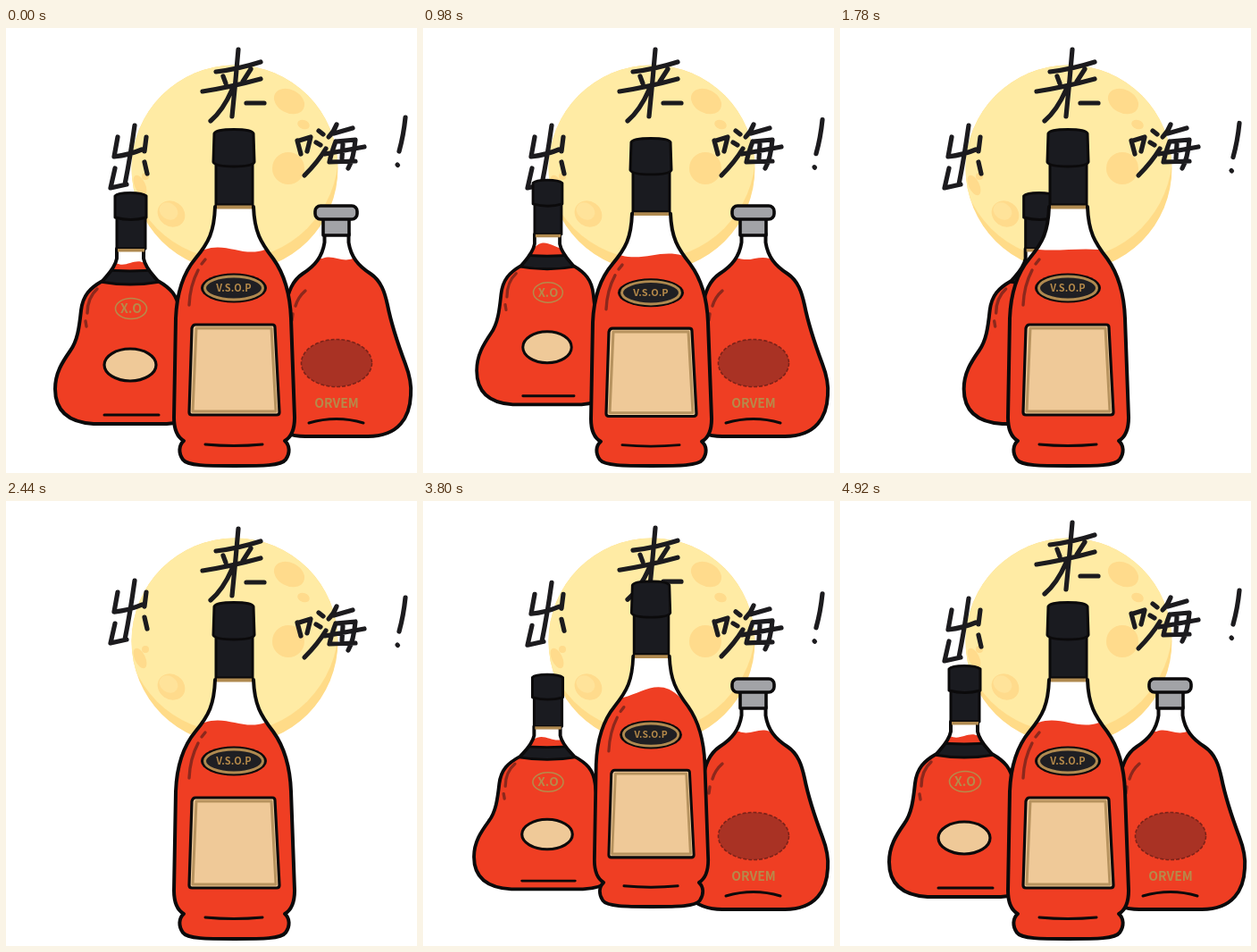
An HTML page that plays this animation: 460 px wide and 498 px high, repeating every 5 s.

```html
<!DOCTYPE html>
<html lang="zh">
<head>
<meta charset="utf-8">
<title>出来嗨</title>
<style>
html, body { margin: 0; width: 100%; height: 100%; overflow: hidden; background: #fff; }
svg { display: block; width: 460px; height: 498px; }
text { font-family: "Noto Sans CJK SC", "Noto Sans CJK JP", "Noto Sans", sans-serif; text-anchor: middle; fill: #b68a4a; font-weight: 700; }
.ink { fill: none; stroke: #1c1b1e; stroke-width: 5.2; stroke-linecap: round; stroke-linejoin: round; }
.edge { fill: none; stroke: #0b0a0b; stroke-width: 4; stroke-linejoin: round; }
.base { fill: none; stroke: #0b0a0b; stroke-width: 3; stroke-linecap: round; }
.shine { fill: none; stroke: #8c281c; stroke-width: 3.4; stroke-linecap: round; }
.red { fill: #ef3e23; }
.cap { fill: #1a1b20; stroke: #0b0a0b; stroke-width: 3; stroke-linejoin: round; }
.steel { fill: #a2a3a7; stroke: #0b0a0b; stroke-width: 3.6; stroke-linejoin: round; }
.gold { fill: #b08a50; }
.tan { fill: #efc998; stroke: #0b0a0b; stroke-width: 3.2; }
</style>
</head>
<body>
<svg viewBox="0 0 460 498">
  <defs>
    <clipPath id="moonClip"><circle cx="256" cy="157" r="115.5"/></clipPath>
    <clipPath id="westHalf"><rect width="256" height="498"/></clipPath>
    <clipPath id="eastHalf"><rect x="256" width="204" height="498"/></clipPath>
    <path id="midBody" d="M234 200C233 228 227 240 212 258C197 276 191 298 190 325L188 436C188 450 192 458 199 462C193 467 193 476 198 483C203 490 225 490 256 490S308 490 313 483C318 476 318 467 312 462C319 458 323 450 323 436L319 325C318 298 312 276 299 258C285 240 278 228 277 200Z"/>
    <path id="westBody" d="M124 247V258C122 269 113 277 108 283C94 291 86 299 84 316C82 335 80 350 72 361C63 374 55 386 55 404C55 425 66 441 98 443H180C212 441 223 425 223 404C223 386 215 374 206 361C198 350 196 335 194 316C192 299 184 291 170 283C165 277 156 269 154 258V247Z"/>
    <path id="eastBody" d="M356.500 230V240C354 256 346 266 332 275C320 283 316 296 313 310C309 330 302 352 293 376C288 389 286 400 287 411C288 435 300 457 335 457H405C440 457 452 435 453 411C454 400 452 389 447 376C438 352 431 330 427 310C424 296 420 283 408 275C394 266 386 256 383.500 240V230Z"/>
    <clipPath id="midClip"><use href="#midBody"/></clipPath>
    <clipPath id="westClip"><use href="#westBody"/></clipPath>
    <clipPath id="eastClip"><use href="#eastBody"/></clipPath>
  </defs>

  <g clip-path="url(#moonClip)">
    <circle cx="256" cy="157" r="116" fill="#ffdb88"/>
    <circle cx="253" cy="140" r="119" fill="#ffeba4"/>
    <g fill="#ffdb8c">
      <ellipse cx="317" cy="82" rx="18" ry="13" transform="rotate(28 317 82)"/>
      <ellipse cx="333" cy="108" rx="7" ry="5" transform="rotate(20 333 108)"/>
      <circle cx="316" cy="157" r="18"/>
      <ellipse cx="150" cy="176" rx="6" ry="12" transform="rotate(-25 150 176)"/>
      <circle cx="156" cy="166" r="4"/>
      <ellipse cx="185" cy="208" rx="16" ry="14" transform="rotate(35 185 208)"/>
    </g>
    <ellipse cx="182" cy="205" rx="11" ry="9" fill="#ffe39a" transform="rotate(35 182 205)"/>
  </g>

  <g class="ink">
    <path id="chu" d="M125 122L121 144Q138 142 152 136M144 109Q139 145 133 175M157 122L155 138M122 157L117 179L135 175M155 150L158 163"/>
    <path id="lai" d="M260 24Q257 60 253 99M235 49Q260 46 285 38M243 54L246 62M274 46L265 60M220 71Q252 66 285 57M253 69Q243 92 229 104M269 84L289 84"/>
    <path id="hai" d="M326 126L330 141M328 126L341 122L337 138M350 115L355 119M347 128L352 131M334 165Q349 150 358 135M370 108Q367 116 361 122M367 118L388 112M369 127Q364 140 362 150L391 149M369 127L391 125Q389 147 383 157M357 141L401 133M377 130L376 146"/>
    <path id="bang" d="M447 100Q445 120 440 138M438 153L438.500 153.500"/>
  </g>

  <g clip-path="url(#westHalf)">
    <g id="west">
      <use href="#westBody" fill="#fff"/>
      <g clip-path="url(#westClip)">
        <path id="westWine" class="red"/>
        <path class="cap" d="M105 270Q139 274 173 270V284Q139 290 105 284Z"/>
      </g>
      <use href="#westBody" class="edge"/>
      <path class="cap" d="M124 212H156V247H124Z"/>
      <path class="cap" d="M122 188Q125 184.500 139 184.500Q153 184.500 157 188V212Q140 217 122 212Z"/>
      <path class="gold" d="M125 247H155V250.500H125Z"/>
      <path class="shine" d="M102 292Q91 302 91 319M89 328L90 334"/>
      <ellipse cx="140" cy="314" rx="17.500" ry="11.500" fill="none" stroke="#b68a4a" stroke-width="1.600"/>
      <text x="140" y="319" font-size="14">X.O</text>
      <ellipse class="tan" cx="139" cy="377" rx="29" ry="18"/>
      <path class="base" d="M110 433H171"/>
    </g>
  </g>

  <g clip-path="url(#eastHalf)">
    <g id="east">
      <use href="#eastBody" fill="#fff"/>
      <g clip-path="url(#eastClip)"><path id="eastWine" class="red"/></g>
      <use href="#eastBody" class="edge"/>
      <path class="steel" d="M355 212H384V232H355Z"/>
      <rect class="steel" x="346" y="199" width="47" height="15" rx="6"/>
      <path class="shine" d="M335 294Q327 301 324 311M321 320L320 327"/>
      <ellipse cx="370" cy="375" rx="39.500" ry="26.500" fill="#a93224" stroke="#7d2218" stroke-width="1.600" stroke-dasharray="4 2"/>
      <text x="370" y="425" font-size="14">ORVEM</text>
      <path class="base" d="M339 442Q370 433 400 442"/>
    </g>
  </g>

  <g id="mid">
    <use href="#midBody" fill="#fff"/>
    <g clip-path="url(#midClip)"><path id="midWine" class="red"/></g>
    <use href="#midBody" class="edge"/>
    <path class="cap" d="M235 152H276V198H235Z"/>
    <path class="cap" d="M233 118Q235 113.500 255 113.500Q275 113.500 277 118L278 150Q276 155 255 155Q234 155 232 150Z"/>
    <path class="gold" d="M236 198.500H275V202.500H236Z"/>
    <path class="shine" d="M223 259L219 264M215 271Q206 288 205 310"/>
    <ellipse cx="255" cy="291" rx="37" ry="16.500" fill="#0b0a0b"/>
    <ellipse cx="255" cy="291" rx="32.500" ry="13" fill="#1f1f23" stroke="#b08a50" stroke-width="3"/>
    <text x="255" y="295" font-size="11">V.S.O.P</text>
    <path class="tan" d="M212 332H298Q301 332 301 335L306 430Q306 433 303 433H208Q205 433 205 430L208 336Q209 332 212 332Z"/>
    <path d="M213 336H297L302 429H209Z" fill="none" stroke="#b7935f" stroke-width="3" stroke-linejoin="round"/>
    <path class="base" d="M223 466Q255 469 287 466"/>
  </g>
</svg>
<script>
const LOOP = 5000, SQUAT = 160, AIR = 430, SLIDE = 320, SWAY = 320;
const BEATS = [660, 1300, 2450, 3730, 4360];
const el = id => document.getElementById(id);
const clamp = v => Math.min(1, Math.max(0, v));
const ease = v => (1 - Math.cos(Math.PI * clamp(v))) / 2;

// x, y: foot of the bottle; hops: start times; hide: [slide in, slide out];
// neck: left edge, width and height of the wine surface
const bottles = {
  mid: { x: 256, y: 490, jump: 54, hops: [925, 3540], neck: [222, 68, 248], tilt: 9 },
  west: { x: 139, y: 443, jump: 30, hops: [710, 3600], neck: [123, 32, 263], tilt: -6,
    away: 140, hide: [1600, 3062] },
  east: { x: 370, y: 457, jump: 28, hops: [180, 4120], neck: [354, 34, 258], tilt: 5,
    away: -140, hide: [1206, 3400] }
};

// Vertical travel of each character on the beat
const travel = { chu: -20, lai: 7, hai: 10 };

// Crouch, fly along half a sine, crouch again, stand up.
function hop(t, start) {
  const takeoff = start + SQUAT, landing = takeoff + AIR;
  const squat = ease((t - start) / SQUAT) * ease((landing + SQUAT - t) / SQUAT);
  const air = Math.sin(Math.PI * clamp((t - takeoff) / AIR));
  return { air, squat: squat * (1 - air) };
}

function drawBottle(id, t) {
  const { x, y, jump, hops, neck, tilt, away = 0, hide = [0, 0] } = bottles[id];
  const { air, squat } = hop(t, t < LOOP / 2 ? hops[0] : hops[1]);
  const dx = away * (ease((t - hide[0]) / SLIDE) - ease((t - hide[1]) / SLIDE));
  el(id).setAttribute("transform", `translate(${x + dx} ${y - jump * air}) ` +
    `scale(${1 - .085 * air} ${1 - .1 * squat}) translate(${-x} ${-y})`);

  const [left, width, level] = neck;
  const dome = level - width * .33 * air;
  const slosh = tilt * Math.cos(4 * Math.PI * t / LOOP);
  el(id + "Wine").setAttribute("d", `M0 498V${level}H${left}` +
    `c${width * .36} ${dome - level - slosh} ${width * .64} ${dome - level + slosh} ${width} 0H460V498Z`);
}

function drawLetters(t) {
  const beat = Math.max(...BEATS.map(b => ease(1 - Math.abs(t - b) / SWAY)));
  const shift = (id, dy) => el(id).setAttribute("transform", `translate(0 ${dy})`);
  for (const id in travel) shift(id, travel[id] * beat);
  shift("bang", 4 - 4 * Math.cos(2 * Math.PI * t / LOOP));
}

// The picture moves in steps of 80 ms after a short hold.
function snap(t) {
  if (t < 180) return 0;
  const start = t < 2360 ? 180 : 2360;
  return Math.min(4920, start + 80 * Math.floor((t - start) / 80));
}

const began = performance.now();
function tick() {
  const t = snap((performance.now() - began) % LOOP);
  for (const id in bottles) drawBottle(id, t);
  drawLetters(t);
  requestAnimationFrame(tick);
}
tick();
</script>
</body>
</html>
```
